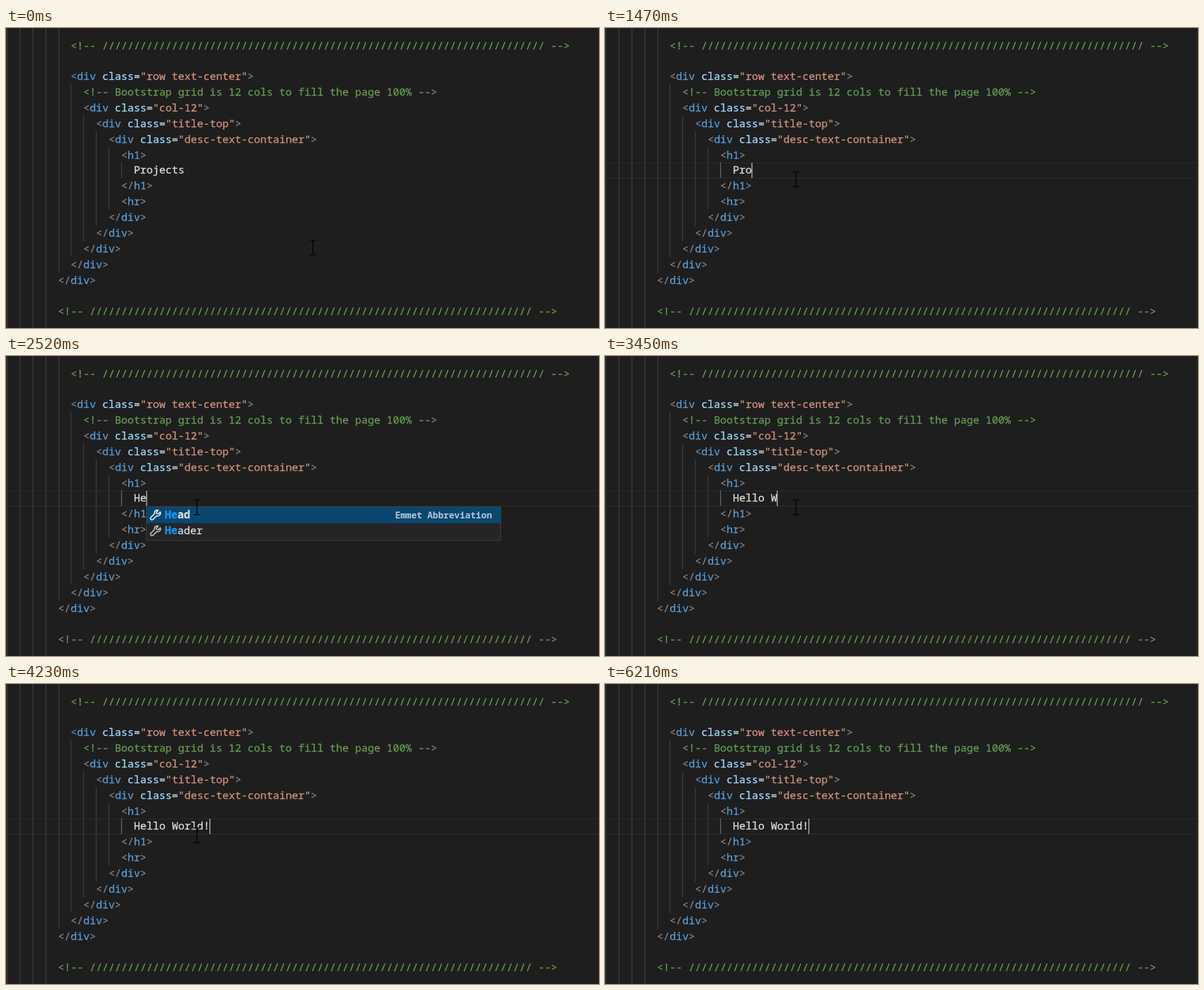
An HTML page that plays this animation: 1053 px wide and 532 px high, repeating every 6.24 s.

```html
<!DOCTYPE html>
<html lang="en">
<head>
<meta charset="utf-8">
<title>Editing a heading</title>
<style>
  html, body { margin: 0; width: 100%; height: 100%; overflow: hidden; background: #1e1e1e; }
  svg { display: block; width: 100%; height: 100%; }
  text, tspan { fill: currentColor; stroke: currentColor; }
  text {
    font-family: "Noto Sans Mono", "DejaVu Sans Mono", monospace;
    font-size: 18.72px;
    font-variant-ligatures: none;
    stroke-width: .35px;
    white-space: pre;
  }
  .b { color: #808080; }
  .t { color: #569cd6; }
  .a { color: #9cdcfe; }
  .s { color: #ce9178; }
  .c { color: #629a50; }
  .p { color: #dcdcdc; }
  .m { color: #1495ee; font-weight: 700; }
  .bold { font-weight: 700; }
  .small { font-size: 15.93px; font-weight: 700; color: #b4c8d8; stroke: none; }
</style>
</head>
<body>
<svg id="stage" viewBox="0 0 1053 532" preserveAspectRatio="none"></svg>
<script>
const LOOP = 6240;
const CHAR = 11.232;
const LEFT = 92.3;
const stage = document.getElementById('stage');

function add(parent, tag, attrs = {}, content) {
  const el = document.createElementNS('http://www.w3.org/2000/svg', tag);
  for (const k in attrs) el.setAttribute(k, attrs[k]);
  if (content !== undefined) el.textContent = content;
  parent.appendChild(el);
  return el;
}

const rect = (parent, x, y, width, height, fill) =>
  add(parent, 'rect', { x, y, width, height, fill });

// parts: [class, string] pairs set one after another
function write(parent, x, y, parts) {
  const text = add(parent, 'text', { x, y });
  for (const [cls, str] of parts) add(text, 'tspan', { class: cls }, str);
  return text;
}

const line = (level, y, ...parts) => write(stage, LEFT + level * 2 * CHAR, y, parts);
const comment = str => ['c', `<!-- ${str} -->`];
const open = (name, cls) => cls
  ? [['b', '<'], ['t', name], ['a', ' class'], ['p', '='], ['s', `"${cls}"`], ['b', '>']]
  : [['b', '<'], ['t', name], ['b', '>']];
const close = name => [['b', '</'], ['t', name], ['b', '>']];

// current-line borders
const focus = add(stage, 'g');
rect(focus, 0, 238.5, 1053, 1.3, '#2b2b2b');
rect(focus, 0, 265.5, 1053, 1.3, '#2b2b2b');

// indent guides: x, top, bottom
[[1, 0, 532], [24, 0, 532], [47, 0, 532], [70, 0, 532], [93, 0, 434],
 [114.5, 99, 406], [137, 155, 378], [159.5, 183, 350], [182, 211, 322]]
  .forEach(([x, top, end]) => rect(stage, x, top, 1.5, end - top, '#3c3c3c'));
const activeGuide = rect(stage, 204.5, 238, 1.5, 28, '#404040');
rect(stage, 1050.5, 0, 1, 532, '#282828');

// code
const slashes = '/'.repeat(70);
line(1, 38, comment(slashes));
line(1, 92, ...open('div', 'row text-center'));
line(2, 120, comment('Bootstrap grid is 12 cols to fill the page 100%'));
line(2, 148, ...open('div', 'col-12'));
line(3, 176, ...open('div', 'title-top'));
line(4, 204, ...open('div', 'desc-text-container'));
line(5, 232, ...open('h1'));
const heading = line(6, 258, ['p', '']).firstChild;
line(5, 286, ...close('h1'));
line(5, 314, ...open('hr'));
for (let level = 4; level >= 0; level--) line(level, 342 + (4 - level) * 28, ...close('div'));
line(0, 509, comment(slashes));

// suggestion list
const popup = add(stage, 'g');
add(popup, 'rect', { x: 249.5, y: 267.5, width: 629, height: 59.5, fill: '#252526', stroke: '#454545' });
rect(popup, 250, 268, 628, 28.5, '#094771');
const wrench = (y, stroke) => add(popup, 'path', {
  transform: `translate(255.5 ${y})`, fill: 'none', stroke, 'stroke-width': 2.1, 'stroke-linejoin': 'round',
  d: 'M18.5 4.5L15 8L12 7.5L11.5 5L15 1.5C11 .3 7.5 3 8.2 7.8L2 14C.5 15.8 1 18 3 18.6C4.6 19 5.5 18 6 17.5L12 11.6C16.5 12.6 20 9 18.5 4.5Z'
});
wrench(272, '#e4e4e4');
wrench(300, '#b8b8b8');
write(popup, 282, 288, [['m', 'He'], ['p bold', 'ad']]);
write(popup, 282, 316, [['m', 'He'], ['p', 'ader']]);
add(popup, 'text', { x: 691, y: 288, class: 'small' }, 'Emmet Abbreviation');

const caret = rect(stage, 0, 239, 1.5, 27, '#c4c4c4');
const mouse = add(stage, 'path', {
  d: 'M-5.5 -13H-1.5L0 -12L1.5 -13H5.5M0 -12V12M-5.5 13H-1.5L0 12L1.5 13H5.5',
  fill: 'none', stroke: '#080808', 'stroke-width': 2
});

// edits: [time, text], one key press each
const CLICK = 480;
const before = 'Projects', after = 'Hello World!';
const edits = [[CLICK, before]];
for (let n = 7; n >= 0; n--) edits.push([1110 + (7 - n) * 90, before.slice(0, n)]);
[2250, 2430, 2700, 2880, 3030, 3210, 3390, 3570, 3720, 3870, 3990, 4200]
  .forEach((t, i) => edits.push([t, after.slice(0, i + 1)]));

// mouse travel: start, end, from, to
const moves = [
  [30, 450, [545, 389.5], [339, 268.5]],
  [5250, 5610, [339, 268.5], [598, 552]]
];

function mouseAt(t) {
  const [t0, t1, from, to] = t < 3000 ? moves[0] : moves[1];
  const u = Math.min(1, Math.max(0, (t - t0) / (t1 - t0)));
  const e = u * u * (3 - 2 * u);
  return from.map((v, i) => v + (to[i] - v) * e);
}

const show = (el, on) => el.setAttribute('visibility', on ? 'visible' : 'hidden');

function render(t) {
  const focused = t >= CLICK;
  let edit = edits[0];
  for (const e of edits) if (e[0] <= t) edit = e;
  const [since, str] = edit;
  heading.textContent = str;
  show(focus, focused);
  activeGuide.setAttribute('fill', focused ? '#686868' : '#404040');
  caret.setAttribute('x', LEFT - .6 + (12 + str.length) * CHAR);
  show(caret, focused && (t - since) % 1000 < 500);
  show(popup, str === 'He');
  mouse.setAttribute('transform', `translate(${mouseAt(t).join(' ')})`);
}

const start = performance.now();
function tick() {
  render((performance.now() - start) % LOOP);
  requestAnimationFrame(tick);
}
tick();
</script>
</body>
</html>
```
